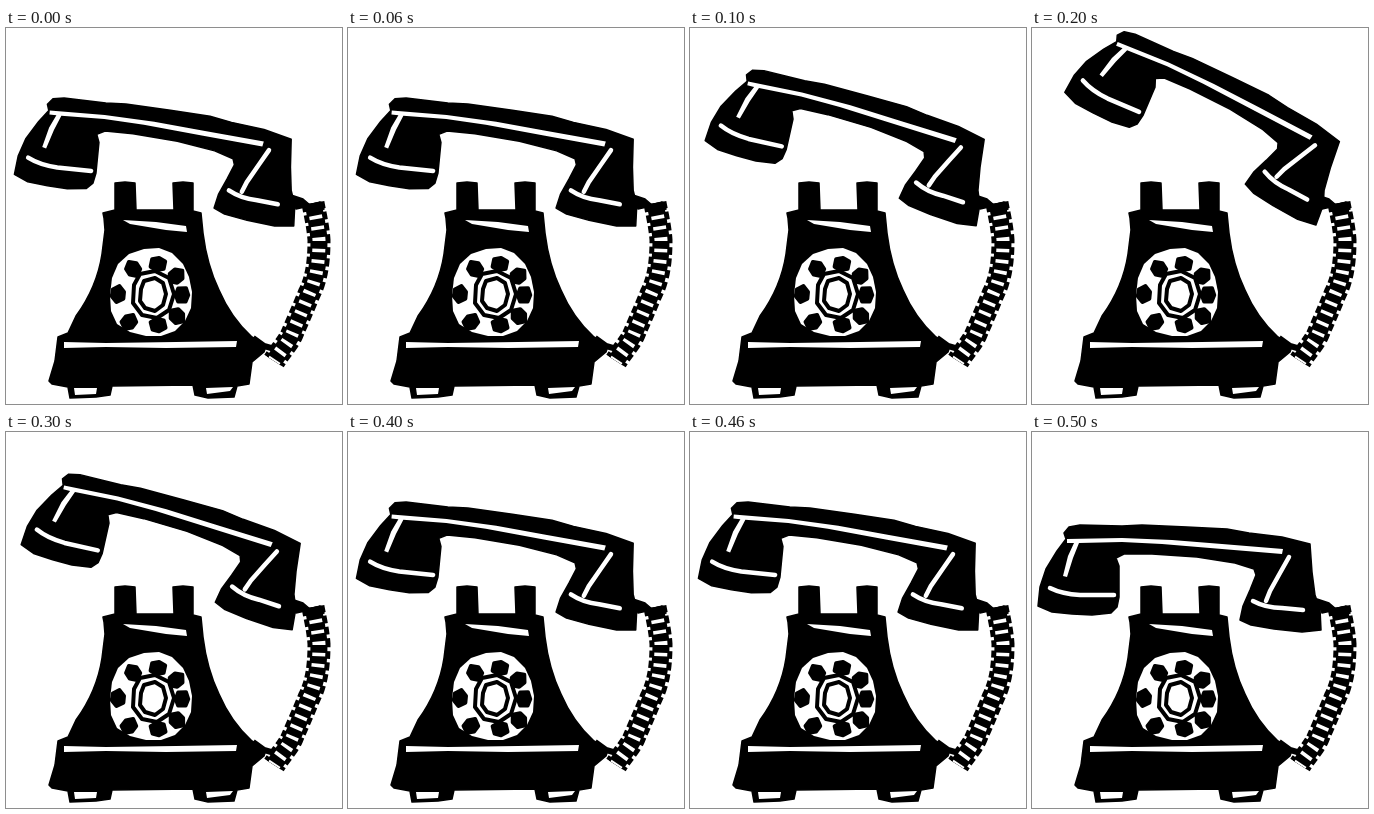
Write an HTML page that moves like this. It is 336 px wide and 376 px high and loops after 0.6 s.

```html
<!DOCTYPE html>
<html lang="en">
<head>
<meta charset="utf-8">
<title>Ringing telephone</title>
<style>
html, body { margin: 0; width: 100%; height: 100%; overflow: hidden; background: #fff; }
svg { display: block; width: 336px; height: 376px; }
.ink { fill: #000; stroke: #000; stroke-width: 1.5; stroke-linejoin: round; }
.cut { fill: #fff; }
.line { fill: none; stroke: #fff; stroke-width: 4.5; stroke-linecap: round; stroke-linejoin: round; }
.cord { fill: none; stroke: #000; }
.ring { fill: #fff; stroke: #000; stroke-width: 4; stroke-linejoin: round; }
#holes { stroke-width: 4; }
</style>
</head>
<body>
<svg viewBox="0 0 336 376">
  <defs>
    <path id="coil" d="M307 175C309 186 312 198 313 212C313 236 310 252 303 266C297 281 291 294 286 306C282 315 275 322 268 333"/>
  </defs>

  <!-- cord: solid tube, raised rungs, white slits -->
  <g class="cord">
    <path d="M247 310L258 318L272 322" stroke-width="6"/>
    <use href="#coil" stroke-width="17"/>
    <use href="#coil" stroke-width="23" stroke-dasharray="7.5 3.5"/>
    <use href="#coil" stroke-width="13" stroke-dasharray="0 2 3.5 5.5" stroke="#fff"/>
  </g>
  <path class="ink" d="M285 167L297 171L304 177L314 174L318 181L305 185L299 179L290 181Z"/>

  <!-- body -->
  <path class="ink" d="M109 155L119 154L129 155L130 182L168 182L167 155L177 154L187 155L187 183L195 185L197 205Q201 237 213 262Q225 290 246 309L260 318L258 324L246 334L243 356L231 358L228 369L202 370L189 367L187 357L106 358L104 367L90 369L64 370L62 359L46 356L43 353L49 333L52 309L62 305L70 288Q91 259 96 226L99 202L98 190L97 185L109 182Z"/>
  <path class="cut" d="M117 192L150 194L180 198L181 204L160 202L124 196ZM58 314L100 315L170 314L231 313L230 319L160 320L100 319L58 320ZM68 360L91 360L90 366L69 367ZM200 360L227 359L224 363L201 366Z"/>

  <!-- dial -->
  <path class="cut" d="M138 221L153 220L166 225L177 236L183 249L186 264L185 280L179 293L169 303L155 308L140 308L124 304L111 296L105 283L104 267L106 250L112 236L123 226Z"/>
  <g id="holes" class="ink"></g>
  <path class="ring" stroke-width="3" d="M134 246L149 243L163 250L168 266L163 282L151 290L136 287L127 275L128 257Z"/>
  <path class="ring" d="M138 253L149 250L157 255L160 266L157 277L149 283L139 280L134 273L135 261Z"/>

  <!-- handset -->
  <g id="handset">
    <path class="ink" d="M37 95L48 93L90 94L110 93L155 95L195 97L217 101L250 105L278 112L280 140L283 163L288 177L289 198L270 200L242 197L219 193L208 188L211 174L218 158L224 143L222 137L203 131L165 125L120 122L92 122L84 126L87 134L87 165L85 175L79 181L60 183L40 182L20 180L6 174L8 155L14 137L25 119L34 107L32 101Z"/>
    <path class="cut" d="M35 107L90 106L140 108L190 112L251 117L250 122L190 117L130 112L90 110L47 111L41 126L35 145L31 144L36 124L42 111L35 111Z"/>
    <path class="line" d="M18 156Q30 162 48 163L82 163M221 169Q234 176 250 176L271 178"/>
    <path class="line" stroke-width="3.5" d="M257 125L248 141L238 159L234 169"/>
  </g>
</svg>
<script>
const $ = id => document.getElementById(id);

// finger holes, slightly irregular hexagons
const holes = [[127, 241], [152, 236], [170, 248], [176, 267], [171, 288], [152, 297], [123, 294], [112, 266]];
$('holes').innerHTML = holes.map(([x, y], i) => {
  const points = Array.from({ length: 6 }, (_, k) => {
    const a = k * Math.PI / 3 + i * .7, r = 7.2 + Math.sin(i * 3 + k * 2);
    return `${x + r * Math.cos(a)},${y + r * Math.sin(a)}`;
  });
  return `<polygon points="${points.join(' ')}"/>`;
}).join('');

// the handset jumps between held poses, hinged at the cord
const STEP = 100, tilt = [5.6, 12.6, 23, 12.6, 5.6, 0];
const start = performance.now();
function draw(now) {
  const pose = Math.floor(Math.max(0, now - start) / STEP) % tilt.length;
  $('handset').setAttribute('transform', `rotate(${tilt[pose]} 289 185)`);
  requestAnimationFrame(draw);
}
draw(start);
</script>
</body>
</html>
```
